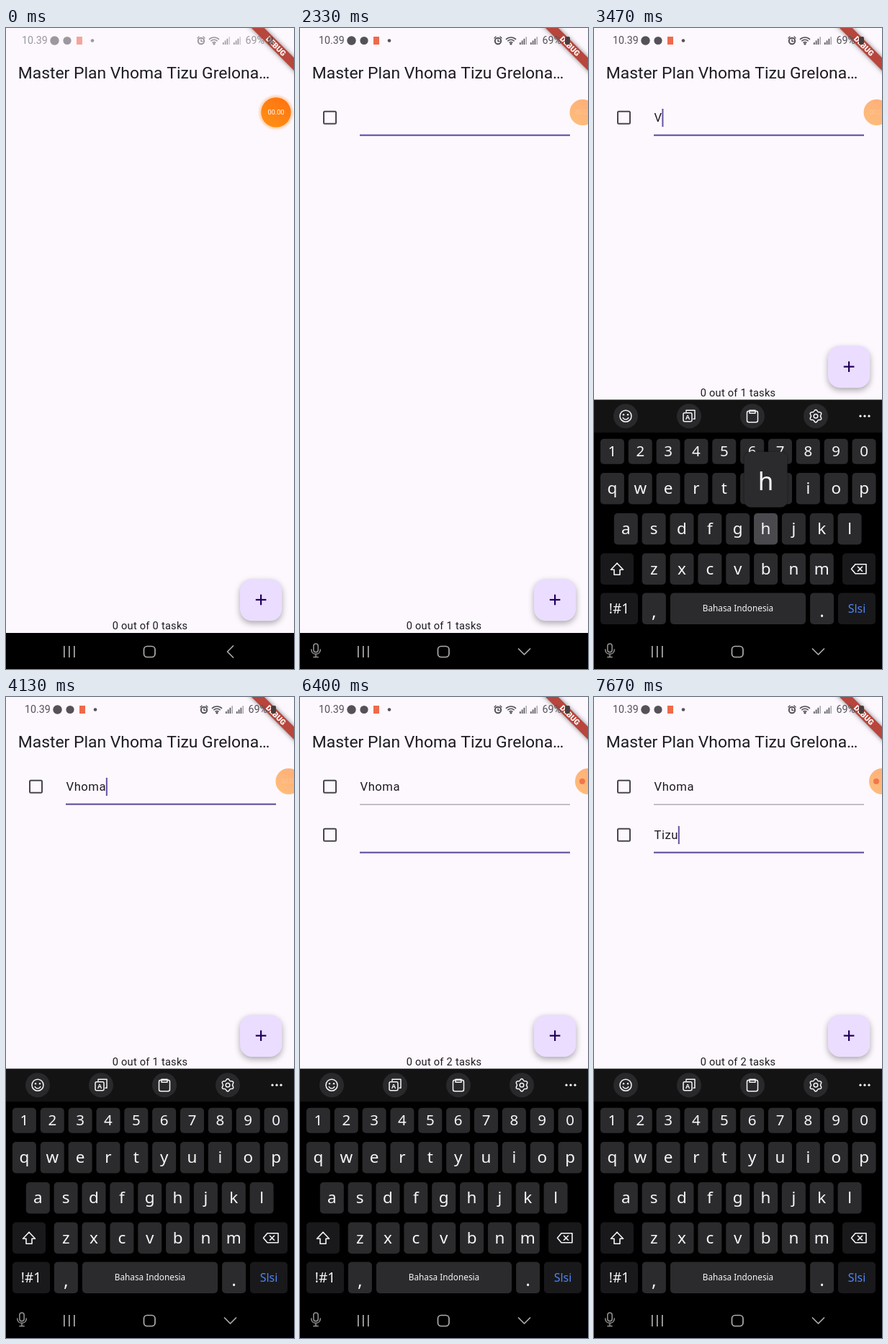
An HTML page with a canvas that plays this animation: 400 by 889 pixels, repeating every 8 s.

```html
<!DOCTYPE html>
<html lang="en">
<head>
<meta charset="utf-8">
<title>Task list</title>
<style>
  html, body { margin: 0; width: 100%; height: 100%; overflow: hidden; background: #fdf8fe; }
  canvas { display: block; width: 400px; height: 889px; }
</style>
</head>
<body>
<canvas id="stage"></canvas>
<script>
const W = 400, H = 889, LOOP = 8000, NAV = 839, KB_HEIGHT = 373.3;
const canvas = document.getElementById('stage');
const c = canvas.getContext('2d');
const dpr = window.devicePixelRatio || 1;
canvas.width = W * dpr;
canvas.height = H * dpr;

const UI = 'Roboto, sans-serif', KEYS = '"Noto Sans", sans-serif';
const PAPER = '#fdf8fe', INK = '#1d1b20', ACCENT = '#6750a4', PLUS = '#21005d';
const KEY = '#2b2b2e', KEY_DARK = '#19191b', KEY_LIT = '#4a4a4e', KEY_INK = '#f6f6f8', NAV_INK = '#acacaf';

// shift: key touched, then back to lower case; press: key down; type: letter shown
const words = [
  { text: 'Vhoma', shift: [3070, 3330], press: [3200, 3400, 3600, 3730, 4000], type: [3390, 3540, 3730, 3870, 4120] },
  { text: 'Tizu', shift: [6600, 7070], press: [6870, 7190, 7330, 7530], type: [7130, 7330, 7460, 7660] }
];
const cursorOn = [
  [[1870, 2300], [2800, 3300], [3390, 4600], [5100, 5600]],
  [[5870, 6400], [6900, LOOP]]
];

const clamp = v => Math.max(0, Math.min(1, v));
const prog = (t, a, b) => clamp((t - a) / (b - a));
const out = u => 1 - (1 - u) ** 3;
const smooth = u => u * u * (3 - 2 * u);
const mix = (a, b, u) => a + (b - a) * u;
const within = (t, [a, b]) => t >= a && t < b;

// cubic-bezier(.2, 0, 0, 1), solved by bisection
function settle(u) {
  let lo = 0, hi = 1;
  for (let i = 0; i < 20; i++) {
    const s = (lo + hi) / 2;
    if (0.6 * s * (1 - s) ** 2 + s ** 3 < u) lo = s; else hi = s;
  }
  return u >= 1 ? 1 : smooth(lo);
}
const keyboardRise = t => KB_HEIGHT * settle(prog(t, 2310, 2595));

function text(s, x, y, size, color, font = UI, align = 'left', weight = 400, spacing = 0) {
  c.font = `${weight} ${size}px ${font}`;
  c.letterSpacing = spacing + 'px';
  c.textAlign = align;
  c.fillStyle = color;
  c.fillText(s, x, y);
  const w = c.measureText(s).width;
  c.letterSpacing = '0px';
  return w;
}
function rect(x, y, w, h, color) {
  c.fillStyle = color;
  c.fillRect(x, y, w, h);
}
function round(x, y, w, h, r, color) {
  c.beginPath();
  c.roundRect(x, y, w, h, r);
  c.fillStyle = color;
  c.fill();
}
function disc(x, y, r, color) {
  c.beginPath();
  c.arc(x, y, r, 0, 7);
  c.fillStyle = color;
  c.fill();
}
function ring(x, y, r, color, width = 1.5, a = 0, b = 7) {
  c.beginPath();
  c.arc(x, y, r, a, b);
  c.strokeStyle = color;
  c.lineWidth = width;
  c.stroke();
}
function frame(x, y, w, h, r, color, width = 1.5) {
  c.beginPath();
  c.roundRect(x, y, w, h, r);
  c.strokeStyle = color;
  c.lineWidth = width;
  c.stroke();
}
function path(d, x, y, color, width = 1.5, fill) {
  c.save();
  c.translate(x, y);
  const p = new Path2D(d);
  c.lineCap = c.lineJoin = 'round';
  c.lineWidth = width;
  c.strokeStyle = color;
  if (fill) { c.fillStyle = color; c.fill(p); }
  c.stroke(p);
  c.restore();
}
function faded(alpha, draw) {
  if (alpha <= 0) return;
  c.save();
  c.globalAlpha *= alpha;
  draw();
  c.restore();
}

function banner() {
  c.save();
  c.translate(W, 0);
  c.rotate(Math.PI / 4);
  c.shadowColor = 'rgba(0,0,0,.5)';
  c.shadowBlur = 6;
  rect(-62, 29.2, 124, 12.5, '#b8463c');
  c.shadowBlur = 0;
  text('DEBUG', 0, 39.2, 10.6, '#fff', UI, 'center', 900);
  c.restore();
}

function signal(x) {
  for (let i = 0; i < 4; i++) {
    const h = 3 + i * 2.6;
    rect(x + i * 2.8, 23 - h, 1.6, h, i < 3 ? '#545258' : '#aaa7ae');
  }
}
function status(x) {
  const g = '#545258';
  text('10.39', x, 22, 14.2, g);
  disc(x + 45.5, 17.5, 6.2, g);
  disc(x + 63, 17.5, 5.6, g);
  rect(x + 76, 12, 8, 11, '#ee6a4c');
  disc(x + 98, 17.5, 2.3, g);
  const a = x + 249;
  ring(a, 18, 4.2, g, 2);
  path('M0-2V0.5H2M-5-4L-3-6M5-4L3-6', a, 18, g, 1.4);
  for (const r of [3.5, 6.7, 10]) ring(a + 18, 23, r, g, 1.6, -2.35, -0.79);
  disc(a + 18, 22, 1.6, g);
  signal(a + 30);
  signal(a + 45);
  text('69%', a + 61.5, 22, 14.2, g);
  round(a + 93, 12, 7, 11, 2, '#4a3c3c');
}
function mic(x, y, s, color, fill) {
  c.save();
  c.translate(x, y);
  c.scale(s, s);
  if (fill) round(-2.5, -7, 5, 9, 2.5, color);
  else frame(-3, -8.5, 6, 11, 3, color, 1.5);
  path('M-6-1C-6 7 6 7 6-1M0 5V9M-3 9H3', 0, 0, color, 1.5);
  c.restore();
}
function statusBar(t) {
  const leave = prog(t, 0, 150), back = prog(t, 2000, 2300);
  faded(0.58 * (1 - leave), () => status(22 - 3 * leave));
  faded(back, () => status(mix(22, 26, out(back))));
  const chip = out(prog(t, 70, 270)) * (1 - prog(t, 1870, 2070));
  if (chip > 0) {
    disc(369, 16, 10 * chip, '#3fb24c');
    mic(369, 15.5, 0.8 * chip, '#fff', true);
  }
}

function bubble(t) {
  const u = smooth(prog(t, 1080, 1670)), v = smooth(prog(t, 4840, 5370));
  const x = mix(mix(375, 392.5, u), 400, v), r = mix(20.8, 18, Math.min(1, u * 1.7));
  faded(1 - u, () => {
    disc(x, 117, 25, 'rgba(255,170,90,.14)');
    disc(x, 117, 23.3, 'rgba(255,160,80,.25)');
  });
  const g = c.createLinearGradient(x + 12, 98, x - 12, 136);
  g.addColorStop(0, '#ff7410');
  g.addColorStop(1, '#ff8f14');
  faded(mix(1, 0.56, Math.min(1, u * 1.7)), () => disc(x, 117, r, g));
  const sec = Math.min(3, Math.floor((t + 530) / 1000));
  faded(mix(1, 0.2, u) * (1 - v), () =>
    text('00.0' + sec, x, 120, mix(9.2, 8.2, u), '#fff', UI, 'center'));
  faded(v, () => disc(392, 117, 4, '#f0774c'));
}

function row(t, i) {
  const y = i * 67, w = words[i];
  frame(33, 115.8 + y, 17, 17, 1.5, '#49454f', 2);
  const moved = prog(t, 5870, 6070), focus = i ? moved : prog(t, 1870, 2070) * (1 - moved);
  rect(83, 148.6 + y, 292, 1, '#8d8493');
  faded(focus, () => rect(83, 147.6 + y, 292, 2, ACCENT));
  const n = w.type.filter(k => t >= k).length;
  const width = n ? text(w.text.slice(0, n), 83.5, 130.3 + y, 16.67, INK, UI, 'left', 400, 0.52) : 0;
  if (cursorOn[i].some(s => within(t, s))) rect(83.3 + width, 112 + y, 2, 25, ACCENT);
}

function fab(t, y) {
  const press = prog(t, 5130, 5330) * (1 - prog(t, 5430, 5600));
  c.save();
  c.shadowColor = 'rgba(0,0,0,.32)';
  c.shadowBlur = 8;
  c.shadowOffsetY = 3.5;
  round(325, y - 29, 58.3, 58.3, 16.7, '#eaddff');
  c.restore();
  faded(press, () => round(325, y - 29, 58.3, 58.3, 16.7, '#e2d6f8'));
  rect(346.8, y - 1.1, 14.6, 2.2, PLUS);
  rect(353, y - 7.3, 2.2, 14.6, PLUS);
}

function keyCap(x, y, w, h, label, size = 22, color = KEY_INK, fill = KEY, dy = 0) {
  round(x - w / 2, y - h / 2, w, h, 5, fill);
  if (label) text(label, x, y + size * 0.34 + dy, size, color, KEYS, 'center');
}
function toolbar() {
  rect(0, 0, W, 45.5, '#131314');
  for (let i = 0; i < 4; i++) disc(44 + 88 * i, 22.5, 17, '#29292c');
  const k = KEY_INK, y = 22.5;
  ring(44, y, 8, k);
  disc(41, y - 2, 1.2, k);
  disc(47, y - 2, 1.2, k);
  ring(44, y + 0.5, 4.2, k, 1.4, 0.3, 2.84);
  frame(124, y - 4.5, 12, 12, 2, k);
  path('M-4-6V-8H8V4H6', 132, y, k);
  text('A', 130, y + 5, 9, k, KEYS, 'center', 700);
  frame(212.5, y - 7, 15, 15.5, 2.5, k);
  path('M-4-8H4V-4H-4Z', 220, y, k);
  c.beginPath();
  for (let i = 0; i <= 48; i++) {
    const a = i * Math.PI / 24, r = 7.6 + 1.1 * Math.cos(a * 6);
    c.lineTo(308 + r * Math.sin(a), y - r * Math.cos(a));
  }
  c.lineWidth = 1.5;
  c.strokeStyle = k;
  c.stroke();
  ring(308, y, 2.8, k);
  for (const x of [370, 376, 382]) disc(x, y, 1.6, k);
}
function keyboard(t, top) {
  c.save();
  c.translate(0, top);
  rect(0, 0, W, H, '#000');
  toolbar();
  const upper = words.some(w => within(t, [w.shift[0] + 60, w.shift[1]]));
  const shifting = words.some(w => within(t, [w.shift[0], w.shift[0] + 70]));
  let active = '';
  for (const w of words)
    w.press.forEach((p, i) => { if (within(t, [p, p + 110])) active = w.text[i].toLowerCase(); });
  let pop = null;
  const rows = [['1234567890', 25.4, 71.5, 35], ['qwertyuiop', 25.4, 123, 43.5],
    ['asdfghjkl', 44.3, 179, 43.5], ['zxcvbnm', 83.2, 234.5, 43.5]];
  for (const [keys, x0, y, h] of rows) {
    [...keys].forEach((ch, i) => {
      const x = x0 + 38.85 * i, on = ch === active, s = upper ? ch.toUpperCase() : ch;
      keyCap(x, y, 33, h, s, h < 40 ? 20.5 : 22.5, KEY_INK, on ? KEY_LIT : KEY);
      if (on) pop = { x, y, s };
    });
  }
  const k = KEY_INK;
  keyCap(32, 234.5, 46, 43.5, '', 0, k, shifting ? KEY_LIT : KEY_DARK);
  path('M0-8L8.5 1H4V8H-4V1H-8.5Z', 32, 234.5, k, 1.6, upper);
  keyCap(368, 234.5, 46, 43.5, '', 0, k, KEY_DARK);
  path('M-10.5 0L-5-6.5H10V6.5H-5ZM-1.5-3L4.5 3M4.5-3L-1.5 3', 368, 234.5, k, 1.6);
  keyCap(35, 289.5, 52, 43.5, '!#1', 19, k, KEY_DARK);
  keyCap(83.4, 289.5, 33, 43.5, ',', 25, k, KEY, 4);
  keyCap(200, 289.5, 188, 43.5, 'Bahasa Indonesia', 11.8);
  keyCap(316.6, 289.5, 33, 43.5, '.', 25, k, KEY, 3);
  keyCap(365, 289.5, 52, 43.5, 'Slsi', 16, '#4f83f2', KEY_DARK);
  if (pop) {
    const x = Math.max(36, Math.min(364, pop.x));
    c.shadowColor = 'rgba(0,0,0,.5)';
    c.shadowBlur = 3;
    round(x - 30, pop.y - 107, 60, 77, 9, KEY);
    c.shadowBlur = 0;
    text(pop.s, x, pop.y - 54, 35, KEY_INK, KEYS, 'center');
  }
  c.restore();
}

function navBar(open) {
  rect(0, NAV, W, H - NAV, '#000');
  for (const x of [80, 87, 94]) rect(x, 857, 1.7, 16, NAV_INK);
  frame(191.5, 857.5, 15.5, 15, 4.5, NAV_INK, 1.7);
  path(open ? 'M-8-4L0 4L8-4' : 'M4-8L-4 0L4 8', 311.5, 865, NAV_INK, 1.7);
  if (open) mic(22, 863, 1.05, '#8f8f92');
}

function draw(t) {
  c.setTransform(dpr, 0, 0, dpr, 0, 0);
  rect(0, 0, W, H, PAPER);
  // the page follows the keyboard a little late, once it clears the nav bar
  const rise = keyboardRise(t), lift = Math.max(0, keyboardRise(t - 68) - (H - NAV));
  const count = t < 730 ? 0 : t < 5270 ? 1 : 2;

  text('Master Plan Vhoma Tizu Grelona…', 16.7, 69.7, 22.9, INK);
  for (let i = 0; i < count; i++) row(t, i);
  text(`0 out of ${count} tasks`, 200, 833.8 - lift, 14.58, INK, UI, 'center', 400, 0.26);
  fab(t, 793 - lift);
  banner();
  if (rise > 0) keyboard(t, H - rise);
  navBar(rise > 0);
  statusBar(t);
  bubble(t);
}

const start = performance.now();
function tick() {
  draw((performance.now() - start) % LOOP);
  requestAnimationFrame(tick);
}
tick();
</script>
</body>
</html>
```
